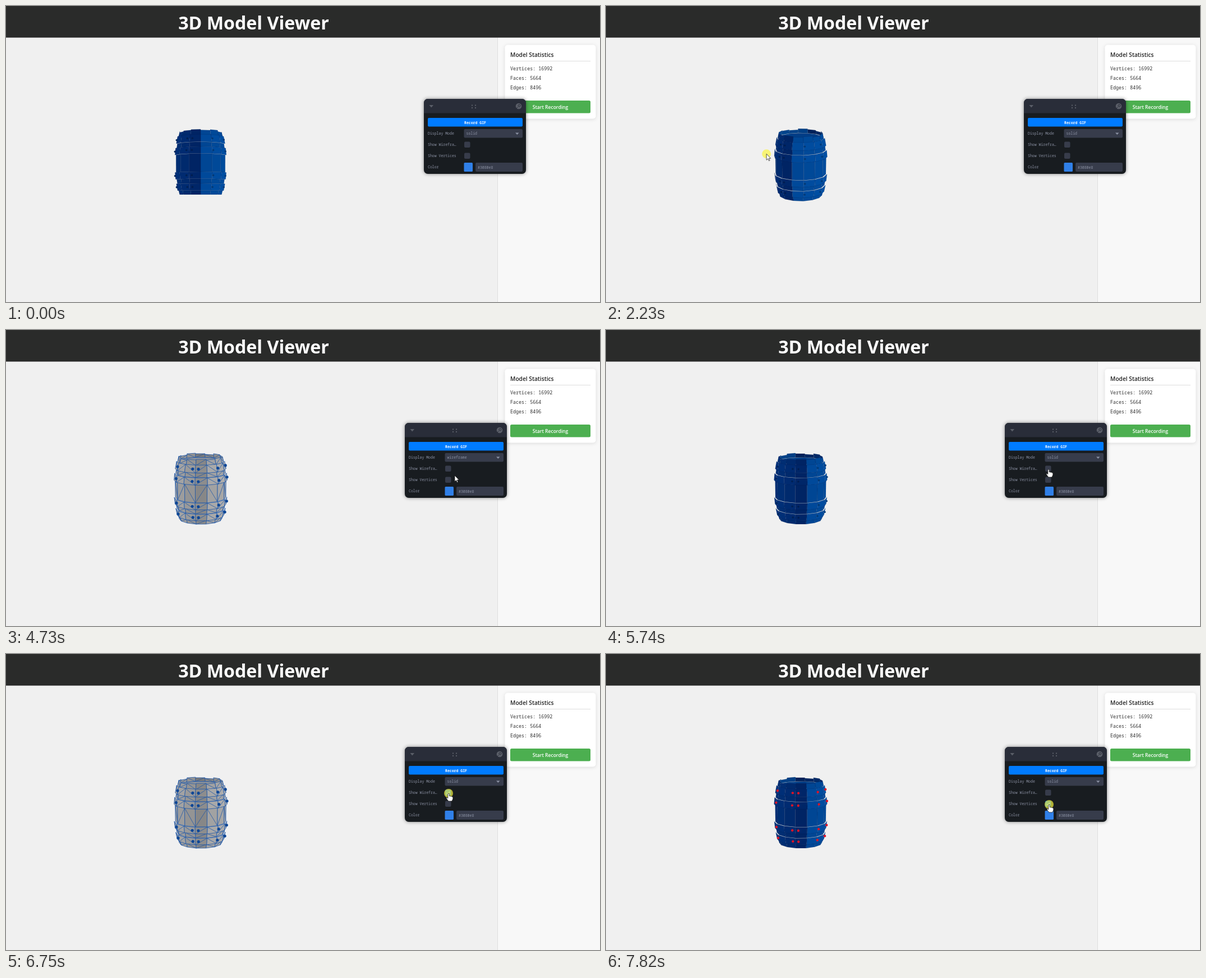
An HTML page for the animation above (8000 ms loop, 1059 px wide and 529 px high).

```html
<!DOCTYPE html>
<html lang="en">
<head>
<meta charset="utf-8">
<title>3D Model Viewer</title>
<style>
  html, body { margin: 0; width: 100%; height: 100%; overflow: hidden; background: #f0f0f0; }
  svg { display: block; }
  text { font-family: "Open Sans", "Noto Sans", sans-serif; }
  .mono text, text.mono { font-family: "Noto Sans Mono", "DejaVu Sans Mono", monospace; }
  .stats { font-size: 8.38px; fill: #333; }
  .panel { font-size: 6.5px; fill: #8c92a4; filter: drop-shadow(0 0 3px rgba(0,0,0,.45)); }
  .input { fill: #373c4b; }
  .icon { fill: #5a5e68; }
  .card { filter: drop-shadow(0 1px 3px rgba(0,0,0,.12)); }
</style>
</head>
<body>
<svg width="1059" height="529" viewBox="0 0 1059 529">
  <rect width="1059" height="529" fill="#f0f0f0"/>
  <g id="barrel" stroke-linejoin="round"></g>

  <rect x="876" y="56" width="183" height="473" fill="#f8f8f8"/>
  <rect x="876" y="56" width="1" height="473" fill="#ddd"/>
  <rect width="1059" height="56.5" fill="#2a2b2a"/>
  <text x="441.5" y="42" font-size="32.2" font-weight="700" fill="#fff" text-anchor="middle">3D Model Viewer</text>

  <rect class="card" x="889.5" y="69.5" width="162" height="132" rx="5" fill="#fff"/>
  <text x="899" y="91" font-size="10.2" font-weight="600" fill="#222">Model Statistics</text>
  <rect x="899" y="98" width="143" height="1" fill="#ddd"/>
  <g class="mono stats">
    <text x="899" y="115">Vertices: 16992</text>
    <text x="899" y="132">Faces: 5664</text>
    <text x="899" y="149">Edges: 8496</text>
  </g>
  <rect x="899" y="169" width="143" height="22.5" rx="2.5" fill="#4caf50"/>
  <text x="970.5" y="184" font-size="8.57" font-weight="600" fill="#fff" text-anchor="middle">Start Recording</text>

  <g id="panel" class="mono panel">
    <rect x="745" y="166" width="182" height="134" rx="7" fill="#181c20"/>
    <path d="M745 191.500V173a7 7 0 0 1 7-7h168a7 7 0 0 1 7 7v18.500z" fill="#292d39"/>
    <path class="icon" d="M754.500 177h7.500l-3.700 4.500z"/>
    <path d="M831 177.500h12M831 182h12" stroke="#5a5e68" stroke-width="2" stroke-dasharray="2 4" transform="translate(-1 0)"/>
    <circle class="icon" cx="914" cy="179" r="5.3"/>
    <path d="M912.500 180.500l-2.500 2.500M917 178a2 2 0 1 1-4 0a2 2 0 1 1 4 0" fill="none" stroke="#292d39"/>
    <rect x="752" y="200" width="169" height="15.500" rx="2" fill="#007bff"/>
    <text x="836.5" y="210.500" font-weight="600" fill="#fff" text-anchor="middle">Record GIF</text>
    <text x="752" y="229.500">Display Mode</text>
    <text x="752" y="250">Show Wirefra…</text>
    <text x="752" y="270">Show Vertices</text>
    <text x="752" y="290">Color</text>
    <rect class="input" x="816.500" y="220" width="104.500" height="15.500" rx="2"/>
    <text id="mode" x="820.500" y="230">solid</text>
    <path d="M908 226.500h6.500l-3.200 3.500z"/>
    <rect id="wireBox" x="817" y="242.500" width="10.500" height="10.500" rx="2"/>
    <rect id="dotsBox" x="817" y="262.500" width="10.500" height="10.500" rx="2"/>
    <path id="wireTick" d="M819.500 248l2 2l3.800-4" fill="none" stroke="#fff"/>
    <path id="dotsTick" d="M819.500 268l2 2l3.800-4" fill="none" stroke="#fff"/>
    <rect x="816.500" y="280" width="15.500" height="16" rx="1.500" fill="#3080e8"/>
    <rect class="input" x="837" y="280" width="84" height="16" rx="2"/>
    <text x="841" y="290.500">#3080e8</text>
  </g>

  <rect id="blank" y="56" width="876" height="473" fill="#242424"/>

  <g id="cursor" fill="#fff" stroke="#111" stroke-width=".7" stroke-linejoin="round">
    <circle id="press" r="8" fill="#faf53c" fill-opacity=".68" stroke="none"/>
    <path id="arrow" d="M0 0V11L2.600 8.600L4.300 12.400L6 11.700L4.300 8H7.600Z"/>
    <path id="hand" d="M-1.200 .8Q0-.6 1.200 .8V5q2-.8 2.600.4q2-.5 2.400.7q1.600 0 1.600 1.400V10L6 14H-.2L-3.800 9.200q-.6-1.600 1-1.600L-1.200 9Z"/>
  </g>
</svg>
<script>
const LOOP = 8000, TAU = Math.PI * 2, RAD = Math.PI / 180;
const ORIGIN = { x: 347, y: 337 }, CAMERA = 950, STAVES = 14, TOP = 111;
const GAPS = [[0, 7], [19, 27], [39, 70], [82, 90], [102, TOP]];
const HOOPS = [[7, 19], [27, 39], [70, 82], [90, 103]];
const RIVETS = [-80, -32, -19, 28, 71, 122, 174, 187, 230];

// Cursor path: time, x, y
const PATH = [
  [290, 978, 505], [1030, 311, 247], [1100, 311, 247], [1700, 252, 264],
  [1900, 258, 263], [2000, 273, 265], [2740, 329.5, 262], [3170, 886, 165],
  [3250, 886, 165], [3300, 884, 172], [3620, 850, 172], [3710, 850, 174],
  [3950, 850, 228], [4150, 850, 228], [4350, 800, 260], [4730, 800, 260],
  [5000, 840, 228], [5150, 840, 228], [5350, 805, 244], [5700, 789, 249],
  [7150, 789, 249], [7400, 790, 269], [8000, 790, 269]
];
const PRESSES = [[1060, 2740], [3300, 3620], [4000, 4090], [5080, 5150], [5850, 5950], [6740, 6820], [7450, 7550], [7820, 8000]];

const $ = id => document.getElementById(id);
const clamp = (v, lo, hi) => Math.min(hi, Math.max(lo, v));
const within = (t, a, b) => t >= a && t < b;
const show = (id, on) => $(id).setAttribute("visibility", on ? "visible" : "hidden");

function cursorAt(t) {
  t = clamp(t, PATH[0][0], LOOP);
  const i = Math.max(1, PATH.findIndex(k => k[0] >= t));
  const [t0, x0, y0] = PATH[i - 1], [t1, x1, y1] = PATH[i];
  let u = (t - t0) / (t1 - t0);
  u = u * u * (3 - 2 * u);
  return { x: x0 + (x1 - x0) * u, y: y0 + (y1 - y0) * u };
}

const radius = h => 45 - 7 * ((h - 55) / 55) ** 2;

function shade(angle, gray, gain = 1) {
  const s = Math.sin(angle), lit = s > 0;
  if (gray) {
    const v = (lit ? 160 + 10 * s : 128 - 32 * s) * gain;
    return `rgb(${v},${v},${v})`;
  }
  const g = lit ? 68 + 8 * s : 33 - 14 * s, b = lit ? 145 + 12 * s : 95 - 22 * s;
  return `rgb(0,${g * gain},${b * gain})`;
}

function drawBarrel(yaw, pitch, wire, dots) {
  const cp = Math.cos(pitch), sp = Math.sin(pitch), step = TAU / STAVES;
  let out = "";

  const project = (a, r, h) => {
    const x = r * Math.sin(a + yaw), z = r * Math.cos(a + yaw);
    const k = CAMERA / (CAMERA - z * cp - h * sp);
    return [ORIGIN.x + x * k, ORIGIN.y - (h * cp - z * sp) * k];
  };
  const line = pts => "M" + pts.map(p => p.map(v => v.toFixed(2)).join(" ")).join("L");
  const stroke = wire ? 'stroke="#1a55a8" stroke-width=".75"' : 'stroke="#001446" stroke-opacity=".25" stroke-width=".6"';

  function quad(i, h0, h1, grow, inside, gain) {
    const a = i * step, b = a + step, mid = a + step / 2;
    const rim = k => h1 === TOP ? TOP + 1.2 * Math.sin(k * 2.1) : h1;
    const pts = [
      project(a, radius(h0) + grow, h0), project(b, radius(h0) + grow, h0),
      project(b, radius(h1) + grow, rim(i)), project(a, radius(h1) + grow, rim(i))
    ];
    const area = pts.reduce((sum, p, n) => {
      const q = pts[(n + 1) % 4];
      return sum + p[0] * q[1] - q[0] * p[1];
    }, 0);
    if (area < 0 === inside) return;
    const fill = shade(inside ? mid + Math.PI : mid, wire, gain);
    const diagonal = wire ? line(i % 2 ? [pts[0], pts[2]] : [pts[1], pts[3]]) : "";
    out += `<path d="${line(pts)}Z${diagonal}" fill="${fill}" ${stroke}/>`;
  }
  const ring = (h0, h1, grow, inside, gain) => {
    for (let i = 0; i < STAVES; i++) quad(i, h0, h1, grow, inside, gain);
  };

  ring(104, TOP, 0, true, 0.9);
  const lid = Array.from({ length: STAVES }, (_, i) => project(i * step, 37, 104));
  out += `<path d="${line(lid)}Z" fill="${wire ? "#989898" : "#003d86"}" ${stroke}/>`;
  for (const [lo, hi] of GAPS) ring(lo, hi, 0, false, 1);
  for (const [lo, hi] of HOOPS) ring(lo, hi, 2, false, 1.04);

  for (const [lo, hi] of HOOPS) {
    const h = (lo + hi) / 2;
    for (const deg of RIVETS) {
      const a = deg * RAD;
      if (Math.cos(a + yaw) < 0) continue;
      const [x, y] = project(a, radius(h) + 2, h);
      const fill = dots ? "#dc1428" : wire ? "#0d4696" : shade(a, false, 0.78);
      out += `<circle cx="${x.toFixed(2)}" cy="${y.toFixed(2)}" r="${wire ? 2.6 : dots ? 2.2 : 1.8}" fill="${fill}"/>`;
    }
  }
  $("barrel").innerHTML = out;
}

function setCheck(name, on) {
  $(name + "Box").setAttribute("fill", on ? "#0070e8" : "#373c4b");
  show(name + "Tick", on);
}

function render(t) {
  const grab = cursorAt(clamp(t, 1060, 2740));
  const wireMode = within(t, 4400, 5350), wireCheck = within(t, 5900, 6820), dots = t >= 7450;
  drawBarrel((grab.x - 311) * 0.763 * RAD, (grab.y - 247) * RAD, wireMode || wireCheck, dots);

  const slide = cursorAt(clamp(t, 3300, 3620)).x - 884;
  $("panel").setAttribute("transform", `translate(${slide} 0)`);
  $("mode").textContent = wireMode ? "wireframe" : "solid";
  setCheck("wire", wireCheck);
  setCheck("dots", dots);
  show("blank", within(t, 6820, 6880));

  const c = cursorAt(t), visible = t >= 290;
  $("cursor").setAttribute("transform", `translate(${c.x} ${c.y})`);
  show("press", visible && PRESSES.some(([a, b]) => within(t, a, b)));
  show("arrow", visible && t < 5600);
  show("hand", t >= 5600);
}

const start = performance.now();
function tick() {
  render((performance.now() - start) % LOOP);
  requestAnimationFrame(tick);
}
tick();
</script>
</body>
</html>
```
